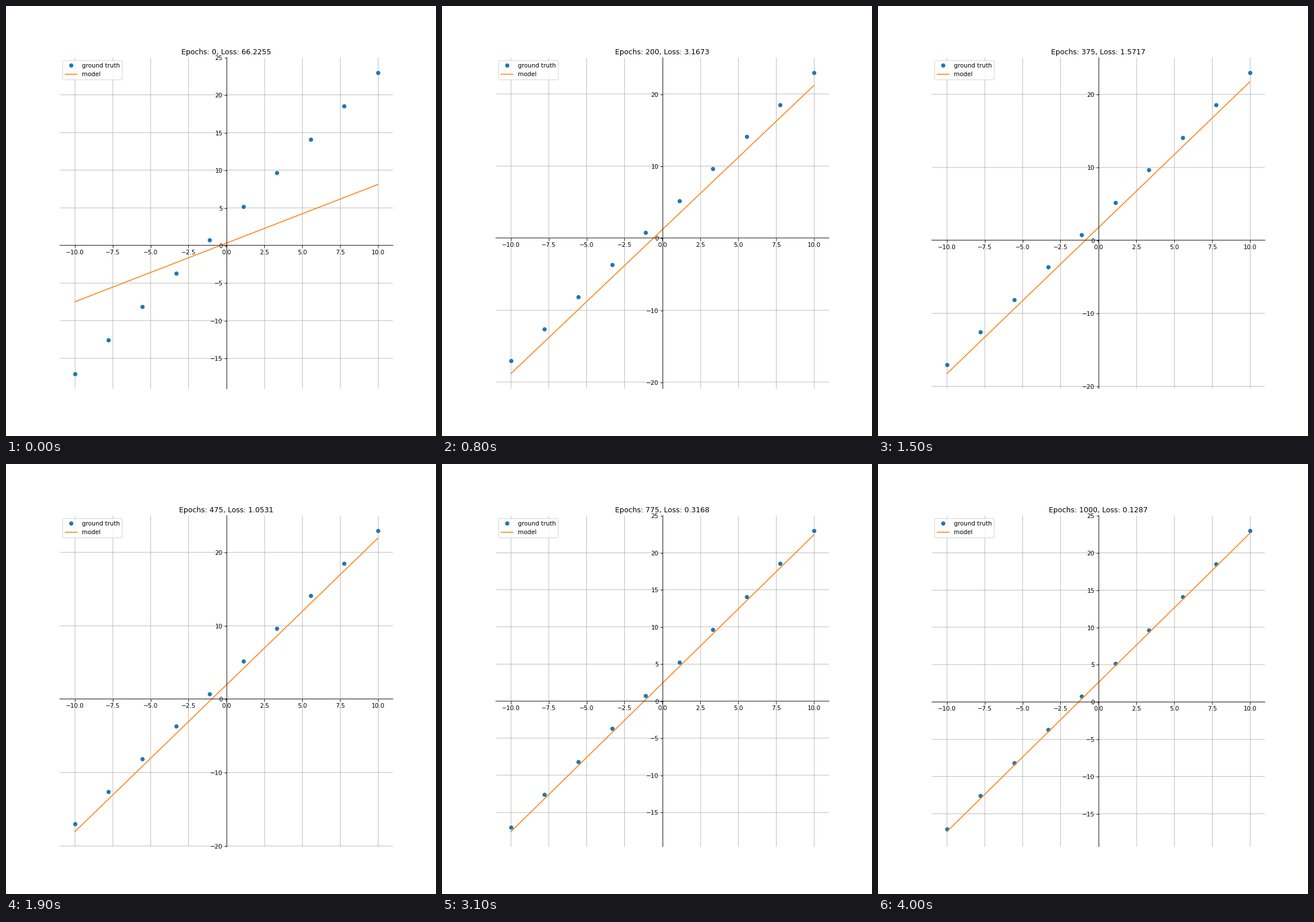
Write a matplotlib script that moves like this. It is 748 px wide and 748 px high and loops after 4.1 s.

```python
import numpy as np
import matplotlib.pyplot as plt
from matplotlib.animation import FuncAnimation
from matplotlib.collections import LineCollection

SIZE, INCHES = 748, 10
FRAMES, INTERVAL = 41, 100
EPOCHS_PER_FRAME = 25
RATE = 0.001
TRUE_W, TRUE_B = 2.0, 3.0
GAP_W, GAP_B = 1.221, 2.656045  # initial parameter errors
START_LOSS = 66.2255
MEAN_SQ = (START_LOSS - GAP_B ** 2) / GAP_W ** 2

# Axes start and span on a virtual 1000-unit canvas that straight lines snap to
X_BOX, Y_BOX = (125, 775), (110, 770)

x = np.linspace(-10, 10, 10)


def fit(epoch):
    """Gradient descent on the mean squared error, in closed form."""
    dw = GAP_W * (1 - 2 * RATE * MEAN_SQ) ** epoch
    db = GAP_B * (1 - 2 * RATE) ** epoch
    return TRUE_W - dw, TRUE_B - db, MEAN_SQ * dw ** 2 + db ** 2


def snap(value, limits, box):
    """Axes fraction of a data value, moved to the nearest canvas unit."""
    lo, hi = limits
    start, span = box
    pos = start + (value - lo) / (hi - lo) * span
    return (np.floor(pos + 0.5) + 0.5 - start) / span


def visible(ticks, limits):
    return [t for t in ticks if limits[0] <= t <= limits[1]]


plt.rcParams["font.family"] = "DejaVu Sans"
plt.rcParams["path.snap"] = False
fig = plt.figure(figsize=(INCHES, INCHES), dpi=SIZE / INCHES)
ax = fig.add_subplot()
ax.plot(x, TRUE_W * x + TRUE_B, "o", label="ground truth")
model, = ax.plot(x, x, label="model")
grid = LineCollection([], colors="#b0b0b0", linewidths=0.8, zorder=0.5,
                      transform=ax.transAxes)
ax.add_collection(grid, autolim=False)
for side in ("right", "top"):
    ax.spines[side].set_visible(False)
ax.legend(loc="upper left")
title = ax.set_title("")


def place_axes():
    """Put the grid and the two zero lines on snapped positions."""
    xlim, ylim = ax.get_xlim(), ax.get_ylim()
    cols = [snap(t, xlim, X_BOX) for t in visible(ax.get_xticks(), xlim)]
    rows = [snap(t, ylim, Y_BOX) for t in visible(ax.get_yticks(), ylim)]
    grid.set_segments([[(c, 0), (c, 1)] for c in cols]
                      + [[(0, r), (1, r)] for r in rows])
    ax.spines["left"].set_position(("axes", snap(0, xlim, X_BOX)))
    ax.spines["bottom"].set_position(("axes", snap(0, ylim, Y_BOX)))


def update(frame):
    epoch = frame * EPOCHS_PER_FRAME
    w, b, loss = fit(epoch)
    model.set_ydata(w * x + b)
    ax.relim()
    ax.autoscale_view()
    place_axes()
    title.set_text(f"Epochs: {epoch}, Loss: {loss:.4f}")
    return model, grid, title


anim = FuncAnimation(fig, update, frames=FRAMES, interval=INTERVAL,
                     init_func=lambda: update(0), repeat=True, repeat_delay=0)
plt.show()
```
